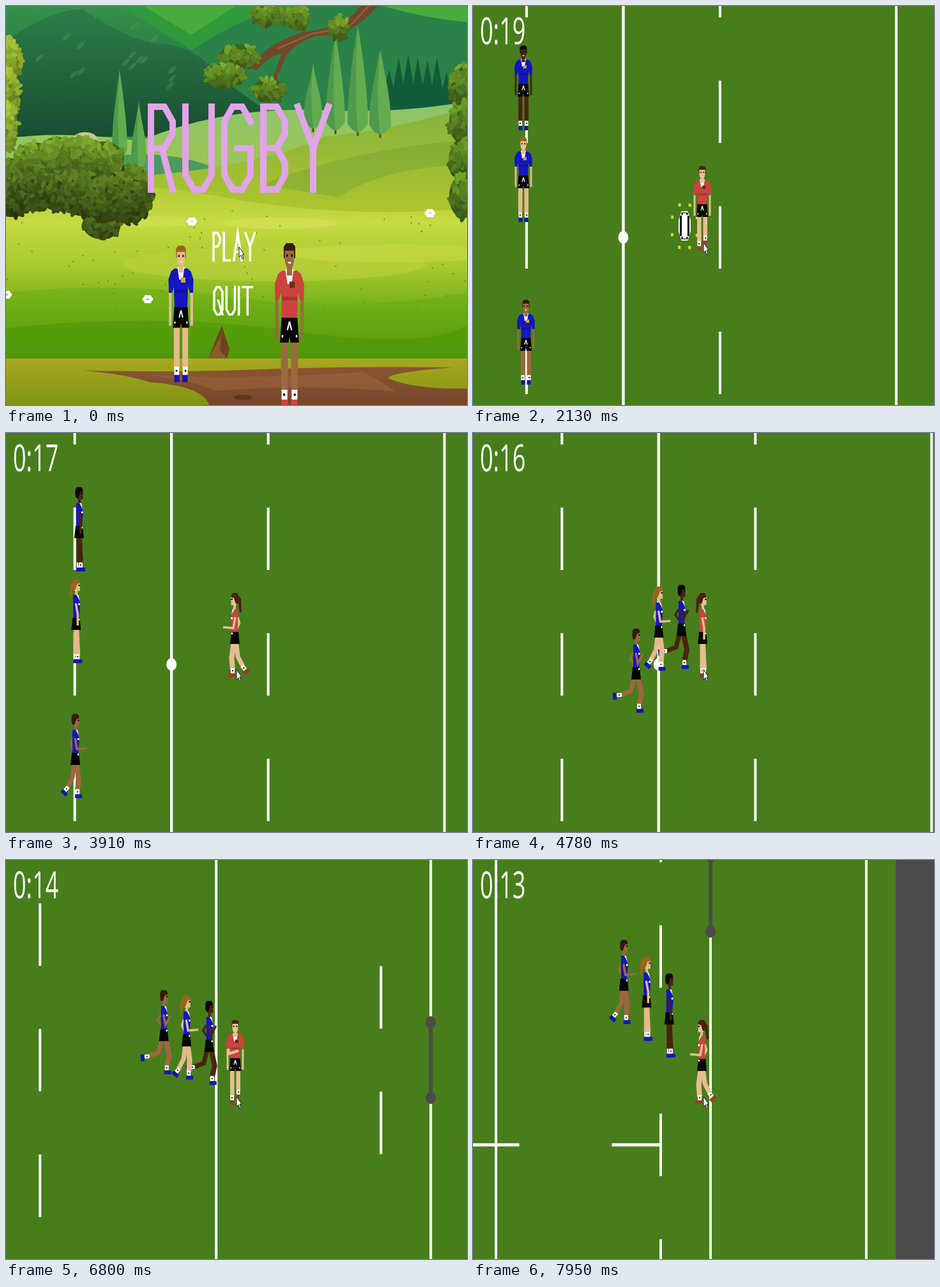
An HTML page with a canvas for the animation above (8 s loop, 722x626 px).

```html
<!DOCTYPE html>
<html lang="en">
<head>
<meta charset="utf-8">
<title>Rugby</title>
<style>
html, body { margin: 0; width: 100%; height: 100%; overflow: hidden; background: #477e1b; }
canvas { display: block; }
</style>
</head>
<body>
<canvas id="stage" width="722" height="626">RUGBY - PLAY - QUIT</canvas>
<script>
const W = 722, H = 626, LOOP = 8000, START = 450;
const stage = document.getElementById('stage').getContext('2d');
let c = stage;

// ---------- helpers ----------
const rect = (col, x, y, w, h) => { c.fillStyle = col; c.fillRect(x, y, w, h); };
function trace(p) {
  c.beginPath();
  for (let i = 0; i < p.length; i += 2) c.lineTo(p[i], p[i + 1]);
}
const poly = (col, ...p) => { trace(p); c.fillStyle = col; c.fill(); };
const line = (col, w, ...p) => { trace(p); c.strokeStyle = col; c.lineWidth = w; c.stroke(); };
const shape = (col, d) => { c.fillStyle = col; c.fill(new Path2D(d)); };
function oval(col, x, y, rx, ry, a = 0) {
  c.beginPath(); c.ellipse(x, y, rx, ry, a, 0, 7); c.fillStyle = col; c.fill();
}
function grad(y0, y1, ...cols) {
  const g = c.createLinearGradient(0, y0, 0, y1);
  cols.forEach((k, i) => g.addColorStop(i / (cols.length - 1), k));
  return g;
}
function place(x, y, sx, sy, draw) {
  c.save(); c.translate(x, y); c.scale(sx, sy); draw(); c.restore();
}
const times = (n, draw) => { for (let i = 0; i < n; i++) draw(i); };
const clamp = (v, a, b) => Math.min(b, Math.max(a, v));
function keyed(keys, t) {
  let i = 0;
  while (i < keys.length - 2 && t > keys[i + 1][0]) i++;
  const [t0, a] = keys[i], [t1, b] = keys[i + 1];
  return a + (b - a) * clamp((t - t0) / (t1 - t0), 0, 1);
}
let seed = 7;
const rnd = () => (seed = seed * 16807 % 2147483647) / 2147483647;

// ---------- octagonal lettering ----------
// Digits are points of a 3 by 3 grid, letters a to i the same points with the corner cut off.
const GLYPHS = { R: '71cf4 59', U: '1gi3', G: 'cagi65', B: '17if4 4fc1', Y: '15 35 58', P: '71cf4',
  L: '179', A: '729 -', Q: '2agic2 59', I: '28', T: '13 28' };
const WIDTHS = { I: 0, L: 32, R: 34, P: 34, B: 34, Y: 48, T: 46 };
function letter(text, x, y, sx, sy, weight, col) {
  c.lineCap = 'square';
  for (const ch of text) {
    const w = WIDTHS[ch] ?? 41;
    const draw = p => line(col, weight, ...p.map((v, i) => i % 2 ? y + v * sy : x + v * sx));
    for (const part of GLYPHS[ch].split(' ')) {
      if (part === '-') { draw([6, 9, w - 6, 9]); continue; }
      const pts = [...part].map(k => {
        const n = isNaN(k) ? k.charCodeAt(0) - 97 : k - 1;
        return { x: n % 3 * w / 2, y: Math.floor(n / 3) * 6.5, cut: isNaN(k) };
      });
      draw(pts.flatMap((p, i) => {
        if (!p.cut) return [p.x, p.y];
        return [pts[i - 1] ?? { x: p.x, y: 6.5 }, pts[i + 1]]
          .flatMap(q => [p.x + Math.sign(q.x - p.x) * 13, p.y + Math.sign(q.y - p.y) * 2.3]);
      }));
    }
    x += (w + 20) * sx;
  }
  c.lineCap = 'butt';
}

// ---------- menu scenery ----------
function bush(x, y, rx, ry, hue = 78, light = 25) {
  oval(`hsl(${hue + 6},58%,${light - 8}%)`, x, y, rx, ry);
  times(rx * ry / 9, () => {
    const a = rnd() * 6.3, r = Math.sqrt(rnd()), dy = r * Math.sin(a);
    oval(`hsl(${hue + rnd() * 8},58%,${light - dy * 9 + rnd() * 9 - 4}%)`,
      x + rx * r * Math.cos(a), y + ry * dy, 7, 3.5, rnd() * 3);
  });
}
function poplar(x, top, foot, w) {
  rect('#5b4a1e', x - 1.5, foot - 8, 3, 14);
  const side = s => `C${x + s * w * .5} ${top + 45} ${x + s * w} ${foot - 55} ${x + s * w} ${foot - 14}Q${x + s * w * .5} ${foot} ${x} ${foot}`;
  shape('#63ac50', `M${x} ${top}${side(1)}V${top}${side(-1)}Z`);
  shape('#3c8a4a88', `M${x} ${top}${side(-1)}Q${x - w * .4} ${foot - 60} ${x} ${top}`);
}
function mountains() {
  rect('#2f9a3c', 0, 0, W, H);
  shape('#48ac3d', 'M215 0H360L290 45Z M560 0H722V40L640 12Z');
  shape(grad(0, 160, '#35914a', '#226b40'), 'M0 0H180Q250 45 300 75L340 190H0Z');
  shape('#2b8248', 'M290 70Q380 10 450 0H590Q660 20 722 25V170H300Z');
  shape(grad(20, 210, '#2b7a48', '#174d30'), 'M0 55Q70 5 120 5Q200 60 250 60Q300 65 345 120L430 180L330 205H0Z');
  times(16, () => oval('#4c9a5b66', 20 + rnd() * 260, 25 + rnd() * 110, 3, 8, .8));
  times(9, i => poly('#125b3a', 600 + i * 15, 70 + rnd() * 35, 615 + i * 15, 165, 585 + i * 15, 165));
}
function meadow() {
  shape(grad(150, 260, '#8cc46c', '#9dc552'), 'M0 208Q90 195 210 212Q330 160 480 163Q610 170 722 150V280H0Z');
  shape('#4b9b60', 'M170 235Q270 225 340 260L290 280H150Z');
  oval('#cfc49a', 124, 209, 19, 11);
  times(2, i => poplar(178 + 30 * i, 100 + 50 * i, 240 + 18 * i, 12));
  shape(grad(165, 320, '#86b23c', '#aec52e'), 'M230 265Q400 250 500 205Q600 195 722 160V340H230Z');
  shape('#6f9f3466', 'M400 280Q540 225 722 210V250Q600 250 520 300Z');
  times(4, i => poplar(481 + 35 * i, 70 - 42 * Math.sin(i * 1.2 - .5), 192 + 3 * i, 14 + i));
  shape(grad(265, 560, '#a9c832', '#c7da42', '#a4c92c', '#6aaa15', '#4a940b'),
    'M0 300Q120 262 330 298Q520 335 722 318V560H0Z');
  oval('#d8e25c88', 430, 341, 89, 9);
  oval('#d3e05777', 210, 338, 90, 9);
  oval('#bfd34288', 420, 405, 238, 27);
  oval('#d2dd4e66', 610, 388, 180, 14);
  shape('#62a91166', 'M0 450Q180 430 360 458Q560 480 722 450V552H0Z');
  shape('#448f0766', 'M0 505Q240 480 450 510T722 500V555H0Z');
  times(80, () => rect('#5d931e', rnd() * W, 320 + rnd() * 175, 2, 2));
}
function path() {
  rect(grad(553, 626, '#a5a91f', '#819313'), 0, 553, W, 73);
  shape(grad(565, 626, '#8b5631', '#76452a'),
    'M120 572Q280 575 400 570T700 567Q600 575 598 584Q640 602 722 600V626H318Q310 597 225 590Q190 578 120 572');
  shape('#9f6b4377', 'M190 577Q380 588 560 574Q590 590 610 605Q460 592 330 604Q270 580 190 577');
  oval('#5e351f', 371, 614, 15, 4);
  poly('#6d431f', 317, 553, 330, 520, 338, 502, 350, 538, 346, 553);
  poly('#8c5a2d', 317, 553, 338, 515, 335, 540, 346, 553);
}
function foliage() {
  bush(150, 342, 30, 24);
  times(6, i => bush(8 + 37 * i, 285 - 10 * Math.sin(i), 38, 46));
  times(4, i => bush(45 + 36 * i, 240 - 10 * Math.sin(i), 32, 26, 78, 33));
  times(3, i => bush(0, 85 + 52 * i, 24 - 3 * i, 38, 70, 40));
  times(4, i => bush(716, 125 + 58 * i, 22, 34, 82, 30));
  shape('#70482c', 'M555 0H582Q545 47 485 47Q450 60 438 80L423 117L418 112L432 74Q410 80 392 101L383 97Q405 60 465 41Q535 33 555 0');
  line('#93633f', 2, 568, 0, 536, 34, 480, 43, 425, 67);
  for (const [x, y] of [[410, 12], [365, 78], [345, 108], [412, 132], [455, 18], [522, 34]])
    bush(x, y, 12 + (550 - x) / 10, 18, 80, 32);
  for (const [x, y] of [[291, 338], [664, 325], [222, 460], [1, 453]])
    times(6, i => oval('#fff', x + 5 * Math.cos(i * 1.05), y + 4 * Math.sin(i * 1.05), 3.3, 3));
}

// ---------- players ----------
const dark = { skin: '#4a2410', hair: '#0c0806' };
const fair = { skin: '#e6b98c', hair: '#9c641c', pony: true };
const tan = { skin: '#9c6840', hair: '#351b0c' };
const blue = { shirt: '#1515c2', shoe: '#1616b0', badge: '#c5a93c' };
const red = { shirt: '#cb433e', shoe: '#9a3d22', badge: '#6b2c18' };
const hero = { skin: '#e6bd91', hair: '#4b2210', pony: true, ...red };

function front(k, run) {
  for (const s of [-1, 1]) place(0, 0, s, 1, () => {
    const up = run && s > 0 ? 9 : 0;
    rect(k.skin, 10.5, 44, 3, 34);
    rect(k.skin, 1.5, 79, 6.5, 40 - up);
    rect('#fff', 2, 118 - up, 5.5, 8);
    rect('#222', 4, 121 - up, 2, 2);
    rect(k.shoe, 1.5, 126 - up, 6, 7);
    poly(k.shirt, 0, 23, 7, 22, 11, 25, 14, 33, 13.5, 46, 10, 46, 8, 40, 7, 62, 0, 62);
    poly('#050505', 0, 60, 7.5, 60, 9, 80, 1, 80, 0, 75);
    rect('#fff', 6, 74, 1.5, 2);
    line('#fff', 1.3, 0, 63, 2, 70);
  });
  rect('#0003', -7, 43, 14, 3);
  poly('#eee', -4, 21, 4, 21, 2, 33, -2, 33);
  rect(k.badge, 0, 31, 5, 5);
  rect(k.skin, -2.5, 16, 5, 10);
  poly(k.hair, -5.5, 12, -5.5, 3, -3, 0, 3, 0, 5.5, 3, 5.5, 12);
  poly(k.skin, -4.5, 6, 4.5, 6, 4.5, 14, 3, 19, -3, 19, -4.5, 14);
  for (const x of [-3, 1.5]) rect('#111', x, 9, 1.5, 2);
  rect('#f2ddd0', -1.5, 15, 3, 1.5);
}
// stride runs from 0, legs together, to 1, widest step
function side(k, stride) {
  const s = stride, limb = (w, ...p) => line(k.skin, w, ...p);
  const foot = (x, y, turn) => {
    c.save(); c.translate(x, y); c.rotate(turn);
    rect('#fff', -3, -2, 6, 8); rect('#222', -1, 1, 2, 2); rect(k.shoe, -4, 6, 11, 6);
    c.restore();
  };
  limb(7, -3 * s, 78, -8 * s, 101 - 3 * s, -24 * s, 119 - 15 * s * s);
  foot(-24 * s, 120 - 16 * s * s, 1.5 * s);
  limb(8, 1 + 3 * s, 78, 2 + 7 * s, 102, 3 + 2 * s, 120);
  foot(3 + 2 * s, 120, 0);
  if (s) limb(3.5, -4, 38, -4 - 5 * s, 47, -2, 57);
  if (k.pony) poly(k.hair, -5, 4, -9, 9, -10, 30, -7, 31, -5, 18);
  rect(k.skin, -1, 16, 4, 12);
  poly(k.shirt, -4, 25, 3, 25, 7, 40, 5, 62, -4, 62, -4, 38);
  poly('#eee', 1, 25, 4, 25, 6, 34);
  rect('#fff', 4, 38, 2.5, 3);
  poly('#050505', -5, 61, 6, 61, 8, 80, -7, 80);
  rect('#fff', 4, 62, 2, 3);
  const bend = Math.PI / 2 - 2.62 * s ** .67;
  limb(3.5, 0, 38, 3, 55, 3 + 16 * Math.cos(bend), 55 + 18 * Math.sin(bend));
  rect(k.skin, -2, 6, 8.5, 13);
  poly(k.hair, -5.5, 4, -3, 0, 4, 0, 6.5, 4, 6, 7, 2, 8, -1, 17, -4, 17, -5.5, 12);
  rect('#111', 4, 9, 2.5, 2);
}

function cursor(x, y) {
  trace([x, y, x, y + 16, x + 3, y + 13, x + 5, y + 19, x + 7, y + 18, x + 5, y + 12, x + 8, y + 12]);
  c.closePath();
  c.fillStyle = '#fff'; c.fill();
  c.strokeStyle = '#222'; c.lineWidth = 1; c.stroke();
}

// ---------- pitch, drawn around its centre spot ----------
const MID = { x: 205.5, y: 363 };
function pitch() {
  const mark = x => rect('#fff', x - 2, -H, 4, 2 * H);
  const dash = (x, y) => rect('#fff', x - 2, y - 49, 4, 98);
  const grey = '#4b4b4b';
  for (const s of [-1, 1]) place(0, 0, s, 1, () => {
    rect(grey, 1053.5, -H, W, 2 * H);
    [0, 427.5, 763.5, 1007.5].forEach(mark);
    times(9, i => dash(151.5, (i - 4) * 197));
    for (const v of [-1, 1]) {
      [98.5, 394, 591].forEach(d => dash(685.5, v * d));
      rect('#fff', 391, v * 394 - 2.5, 73, 5);
      rect('#fff', 609, v * 394 - 2.5, 76, 5);
      oval(grey, 763.5, v * 59, 8, 10);
    }
    rect(grey, 760.5, -59, 6, 118);
  });
  oval('#fff', 0, 0, 8, 10);
}
function ball(x, y, t) {
  poly('#fff', x - 5, y - 23, x + 5, y - 23, x + 9.5, y - 9, x + 9.5, y + 9, x + 5, y + 23, x - 5, y + 23, x - 9.5, y + 9, x - 9.5, y - 9);
  for (const s of [-1, 1]) {
    rect('#000', x + s * 6 - 1.5, y - 16, 3, 32);
    rect('#000', x - 5, y + s * 19 - 2, 10, 4);
  }
  rect('#fff', x - 3, y - 20, 6, 40);
  times(8, i => {
    const a = i * Math.PI / 4 - 1.62 + (t - 1320) / 400;
    rect('#d9d72e', x + 21 * Math.cos(a) - 2, y + 36 * Math.sin(a) - 2, 4, 5);
  });
}

// ---------- play ----------
const CAMERA = [[1190, -22], [1450, 22], [2400, 33], [3780, 33], [4436, 136.5], [5930, -85.5], [6800, -303.5], [7950, -597]];
const CHASE = 3780, DIVE = 6585;
const RUNNERS = [
  { ...dark, ...blue, x: 49, y: 62, pace: .176, phase: .735 },
  { ...fair, ...blue, x: 49, y: 206, pace: .176, phase: .85 },
  { ...tan, ...blue, x: 53, y: 461, pace: .154, phase: .6 }
];
function strideAt(t, phase) {
  const quarter = Math.floor(((t - 4780) / 505 + phase) * 4);
  return Math.round(1 - Math.cos(quarter * Math.PI / 2)) / 2;
}
// The runners close in, then trail the hero in a row that fans out as she turns down the pitch.
function chase(r, i, t, drop) {
  const u = t - CHASE, x0 = r.x + 33;
  const x = 326 - 35.5 * i - Math.max(0, t - 5930) * .0095;
  const y = 241 - (1.8 + .75 * i) * drop ** .62;
  return [x0 + (x - x0) * Math.min(1, u / 1000), r.y + clamp(y - r.y, -r.pace * u, r.pace * u)];
}

function game(t) {
  const shift = keyed(CAMERA, t), drop = Math.max(0, t - DIVE) * .227;
  rect('#477e1b', 0, 0, W, H);
  place(MID.x + shift, MID.y - drop, 1, 1, pitch);
  if (t < 2350) ball(301.5 + shift, 345, t);

  RUNNERS.forEach((r, i) => {
    if (t < CHASE) place(r.x + shift, r.y, 1, 1, () => front(r));
    else place(...chase(r, i, t, drop), 1, 1, () => side(r, strideAt(t, r.phase)));
  });

  const facing = t < 2300 ? 0 : t < 3700 ? 1 : t < 4436 ? -1 : t < DIVE ? 1 : t < 7700 ? 0 : -1;
  place(359, 251, facing || 1, 1, () => {
    if (facing) return side(hero, strideAt(t, .1));
    front(hero, true);
    if (t > DIVE) line(hero.skin, 4, -11, 45, -9, 53, 5, 48);
  });

  const left = 20 - Math.max(0, Math.floor((t - 260) / 1000));
  place(11, 60, .62, 1, () => {
    c.font = '58px "Open Sans", "Noto Sans", sans-serif';
    c.fillStyle = '#fff';
    c.fillText('0:' + left, 0, 0);
  });
  cursor(361, 371);
}

const backdrop = document.createElement('canvas');
backdrop.width = W; backdrop.height = H;
c = backdrop.getContext('2d');
mountains();
meadow();
path();
foliage();
c = stage;

function menu(t) {
  c.drawImage(backdrop, 0, 0);
  const hue = 293 + 12 * ((t >= 70) + (t >= 190));
  letter('RUGBY', 227, 158, 1, 10, 10, `hsl(${hue},62%,78%)`);
  letter('PLAY', 325, 356, .3, 3.3, 3.5, '#fff');
  letter('QUIT', 326, 441, .317, 3.3, 3.5, '#fff');
  place(274, 376, 1.4, 1.61, () => front({ ...fair, ...blue }));
  place(444, 372, 1.65, 1.95, () => front({ ...tan, ...red, shoe: '#cb433e' }));
  cursor(365, 378);
}

function frame() {
  const t = performance.now() % LOOP;
  (t < START ? menu : game)(t);
  requestAnimationFrame(frame);
}
frame();
</script>
</body>
</html>
```
